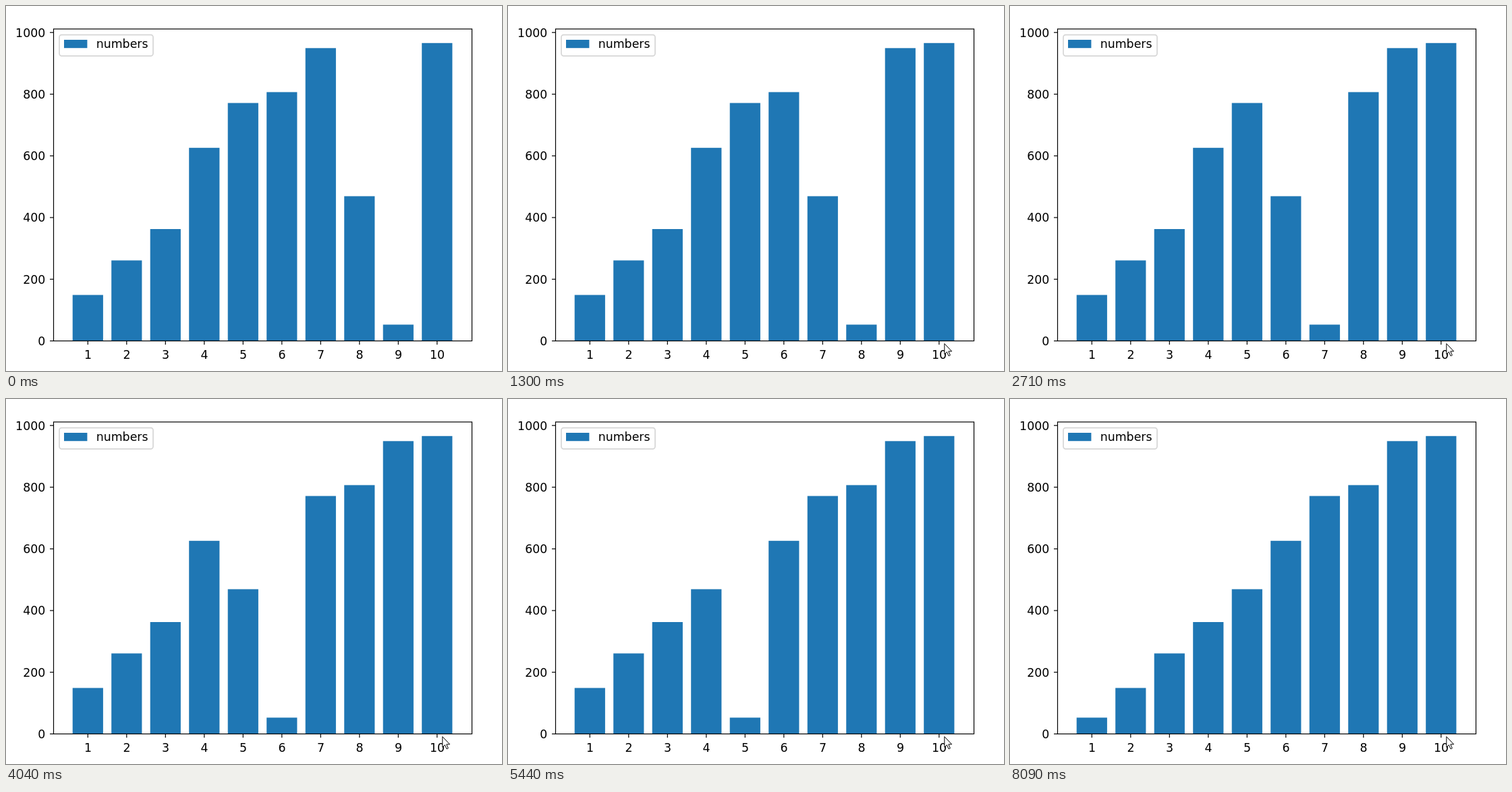
An HTML page with a canvas that plays this animation: 735 px wide and 540 px high, repeating every 8.87 s.

```html
<!DOCTYPE html>
<html lang="en">
<head>
<meta charset="utf-8">
<title>Bubble sort bar chart</title>
<style>
html, body { margin: 0; width: 735px; height: 540px; overflow: hidden; background: #fff; }
canvas { display: block; }
</style>
</head>
<body>
<canvas id="stage" width="735" height="540"></canvas>
<script>
const ctx = document.getElementById('stage').getContext('2d');
const LOOP = 8870, BLUE = '#1f77b4';
const PITCH = 57.5, BAR_W = 45.2, FIRST_X = 98.7;
const LEFT = 70.5, RIGHT = 690.5, TOP = 34, BASE = 495.5;

// Top edge of each bar in its starting order
const startTops = [427.5, 376.4, 330, 209.8, 143.5, 127.4, 62.3, 281.4, 471.4, 54.8];
// [time, left index]: swap neighbours
const swaps = [
  [690, 6], [1300, 7], [2010, 5], [2710, 6], [3340, 4], [4040, 5],
  [4740, 3], [5440, 4], [6130, 3], [6760, 2], [7460, 1], [8090, 0]
];
// [time, y] of the pointer's tip
const pointerSteps = [[230, 521], [307, 508], [383, 495.5], [460, 499.5]];
const pointer = new Path2D('M0 0V15.6L3.6 12.3L6.2 18.2L8.5 17.2L6 11.4H10.8Z');

function line(x1, y1, x2, y2) {
  ctx.beginPath();
  ctx.moveTo(x1, y1);
  ctx.lineTo(x2, y2);
  ctx.stroke();
}

function label(text, x, y, align) {
  ctx.textAlign = align;
  ctx.fillText(text, x, y);
}

function drawBars(t) {
  const tops = startTops.slice();
  for (const [time, i] of swaps) {
    if (t >= time) [tops[i], tops[i + 1]] = [tops[i + 1], tops[i]];
  }
  ctx.fillStyle = BLUE;
  tops.forEach((y, i) => ctx.fillRect(FIRST_X + i * PITCH, y, BAR_W, BASE - y));
}

function drawAxes() {
  ctx.strokeStyle = ctx.fillStyle = '#000';
  ctx.lineWidth = 1.2;
  ctx.strokeRect(LEFT, TOP, RIGHT - LEFT, BASE - TOP);
  for (let i = 0; i < 10; i++) {
    const x = FIRST_X + BAR_W / 2 + i * PITCH;
    line(x, BASE, x, BASE + 5.5);
    label(i + 1, x + 0.3, 521.5, 'center');
  }
  for (let value = 0; value <= 1000; value += 200) {
    const y = BASE - value * 0.4563;
    line(LEFT - 5.5, y, LEFT, y);
    label(value, 58.3, y + 6.3, 'right');
  }
}

function drawLegend() {
  ctx.strokeStyle = '#d6d6d6';
  ctx.lineWidth = 1.7;
  ctx.beginPath();
  ctx.roundRect(79, 42.6, 139, 31.2, 3.5);
  ctx.stroke();
  ctx.fillStyle = BLUE;
  ctx.fillRect(86, 50, 34.4, 12.2);
  ctx.fillStyle = '#000';
  label('numbers', 133.7, 62.3, 'left');
}

function drawPointer(t) {
  const step = pointerSteps.filter(([time]) => t >= time).pop();
  if (!step) return;
  ctx.save();
  ctx.translate(646.8, step[1]);
  ctx.fillStyle = '#fff';
  ctx.strokeStyle = '#000';
  ctx.lineWidth = 1;
  ctx.fill(pointer);
  ctx.stroke(pointer);
  ctx.restore();
}

function draw(t) {
  ctx.fillStyle = '#fff';
  ctx.fillRect(0, 0, 735, 540);
  ctx.font = '17.36px "DejaVu Sans", sans-serif';
  drawBars(t);
  drawAxes();
  drawLegend();
  drawPointer(t);
}

const start = performance.now();
function tick() {
  draw((performance.now() - start) % LOOP);
  requestAnimationFrame(tick);
}
tick();
</script>
</body>
</html>
```
